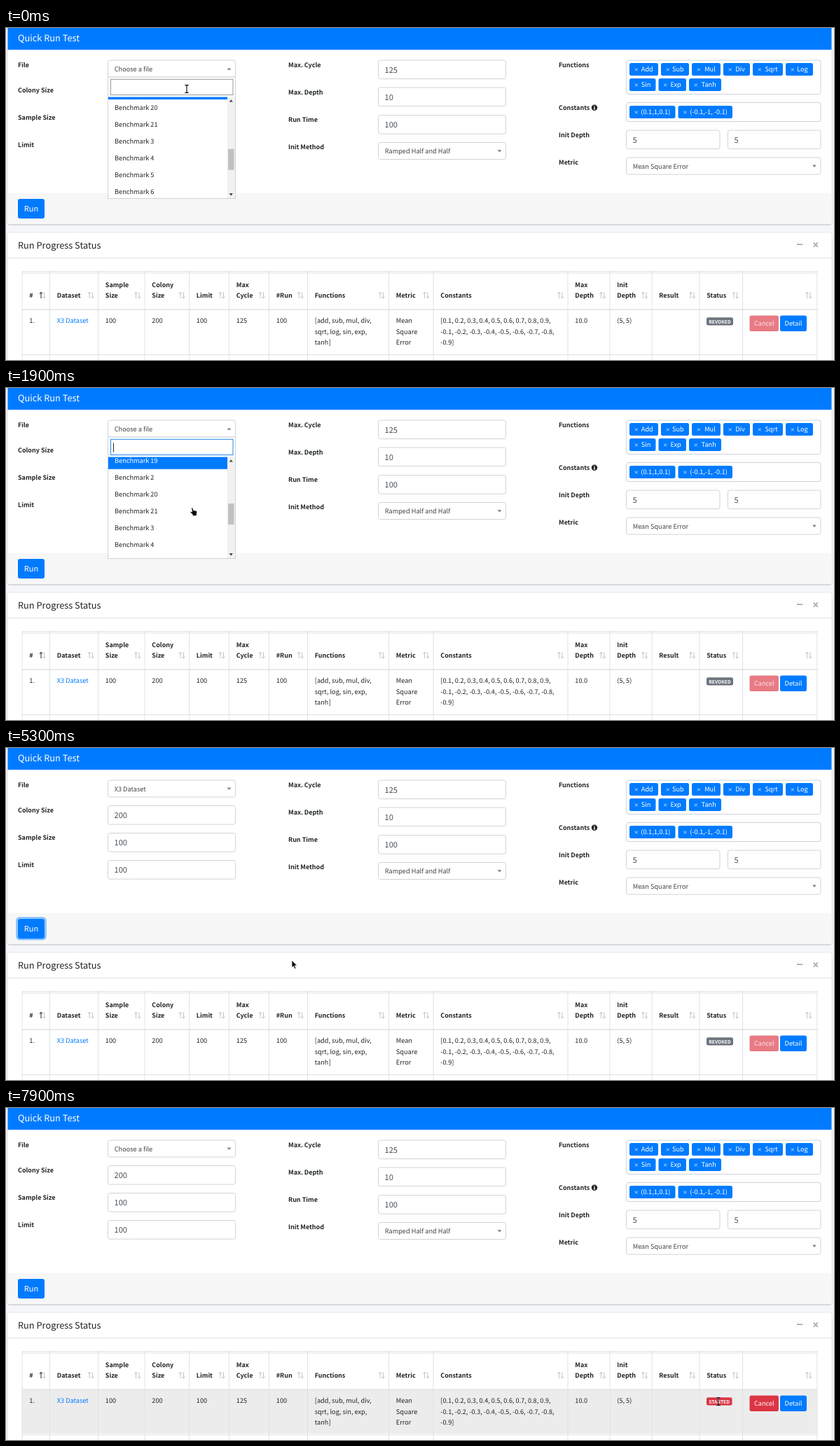
Animation, 1182 px wide and 474 px high, one loop 8 s. Source, as an HTML page:

```html
<!DOCTYPE html>
<html lang="en">
<head>
<meta charset="utf-8">
<title>Quick Run Test</title>
<style>
  html, body { margin: 0; width: 100%; height: 100%; overflow: hidden; background: #f4f6f9; }
  svg { display: block; }
  text {
    font-family: "Noto Sans CJK JP", "Noto Sans CJK SC", "Noto Sans CJK", "Open Sans", sans-serif;
    text-rendering: geometricPrecision;
    white-space: pre;
  }
</style>
</head>
<body>
<svg id="stage" width="1182" height="474" viewBox="0 0 1182 474">
  <defs>
    <clipPath id="listClip"><rect x="146" y="98.5" width="170" height="144.5"/></clipPath>
    <filter id="soft" x="-2%" y="-10%" width="104%" height="120%">
      <feDropShadow dx="0" dy=".7" stdDeviation="1" flood-opacity=".28"/>
    </filter>
  </defs>
</svg>
<script>
const stage = document.getElementById('stage');
const BLUE = '#007bff', INK = '#212529', FIELD = '#495057', EDGE = '#ced4da', LINE = '#dee2e6';
const BASE = 10.28, INPUT = 12.4, TITLE = 14.3;
const LEFT = 2.5, RIGHT = 1178.5;

function add(tag, attrs, parent = stage) {
  const node = document.createElementNS('http://www.w3.org/2000/svg', tag);
  for (const key in attrs) node.setAttribute(key, attrs[key]);
  return parent.appendChild(node);
}
const group = (parent, attrs = {}) => add('g', attrs, parent);
const rect = (x, y, x2, y2, fill, parent, extra) =>
  add('rect', { x, y, width: x2 - x, height: y2 - y, fill, ...extra }, parent);
const path = (d, attrs, parent) => add('path', { d, fill: 'none', ...attrs }, parent);

// Text placed by its left edge (or anchor) and the middle of its capitals.
function label(x, mid, str, { size = BASE, fill = INK, bold, anchor = 'start', parent } = {}) {
  const node = add('text', {
    x, y: mid + size * 0.33, fill, 'font-size': size * (bold ? 0.875 : 0.895),
    'font-weight': bold ? 700 : 400, 'text-anchor': anchor
  }, parent);
  node.textContent = str;
  return node;
}
const box = (x, y, x2, y2, parent) =>
  rect(x + .5, y + .5, x2 - .5, y2 - .5, '#fff', parent, { rx: 3, stroke: EDGE });
function input(x, y, x2, value) {
  box(x, y, x2, y + 27.6);
  label(x + 9.5, y + 14.2, value, { size: INPUT, fill: FIELD });
}
const triangle = (x, y, up, fill, parent, w = 3) =>
  path(`M${x - w},${y + (up ? 1.6 : -1.6)}h${2 * w}l${-w},${up ? -3.4 : 3.4}z`, { fill }, parent);
const cross = (x, y, r, attrs) => path(`M${x - r},${y - r}l${2 * r},${2 * r}m0,${-2 * r}l${-2 * r},${2 * r}`, attrs);
function select(x, y, x2, value) {
  box(x, y, x2, y + 25);
  triangle(x2 - 9.5, y + 12.7, false, '#888');
  return label(x + 9.7, y + 12.7, value, { fill: '#444' });
}
function tag(x, y, x2, str) {
  rect(x, y, x2, y + 18, BLUE, stage, { rx: 2.8 });
  cross(x + 9.8, y + 9.4, 1.9, { stroke: '#d9eaff', 'stroke-width': .9 });
  label(x2 - 7.2, y + 9, str, { fill: '#fff', anchor: 'end' });
}

// Run form
const cardTop = group(stage, { filter: 'url(#soft)' });
rect(LEFT, -5, RIGHT, 280, '#fff', cardTop, { rx: 3 });
rect(LEFT, 0, RIGHT, 31, BLUE);
label(17, 14.2, 'Quick Run Test', { size: TITLE, fill: '#fff' });
rect(LEFT, 235.5, RIGHT, 280, '#f7f7f7', stage, { rx: 2 });

[
  [17, ['File', 53], ['Colony Size', 89], ['Sample Size', 128], ['Limit', 167]],
  [403, ['Max. Cycle', 53], ['Max. Depth', 92], ['Run Time', 131], ['Init Method', 170]],
  [789, ['Functions', 53], ['Constants', 114], ['Init Depth', 153], ['Metric', 192]]
].forEach(([x, ...rows]) => rows.forEach(([str, y]) => label(x, y, str, { bold: true })));

const fileText = select(145, 45.5, 328, 'Choose a file');
input(145, 82, 328, '200');
input(145, 121, 328, '100');
input(145, 160, 328, '100');
input(531, 45.5, 714, '125');
input(531, 84.5, 714, '10');
input(531, 124, 714, '100');
select(531, 163, 714, 'Ramped Half and Half');
box(885, 45.5, 1163.5, 95);
box(885, 106, 1163.5, 134);
input(885, 145.5, 1019.5, '5');
input(1030, 145.5, 1163.5, '5');
select(885, 184.5, 1163.5, 'Mean Square Error');
[
  [890, 50, 931, 'Add'], [935, 50, 975, 'Sub'], [979, 50, 1020, 'Mul'],
  [1024, 50, 1062, 'Div'], [1066, 50, 1109, 'Sqrt'], [1113, 50, 1152, 'Log'],
  [890, 72, 927.5, 'Sin'], [931.5, 72, 971, 'Exp'], [975, 72, 1021, 'Tanh'],
  [890, 111, 955.5, '(0.1,1,0.1)'], [959.5, 111, 1037, '(-0.1,-1, -0.1)']
].forEach(args => tag(...args));
add('circle', { cx: 840, cy: 113.7, r: 4.2, fill: INK });
path('M840,111v1.3M839,113.3h1v2.6M838.8,116h2.4', { stroke: '#fff', 'stroke-width': 1.1 });

const ring = rect(15.5, 242.5, 56.5, 273, 'none', stage, { rx: 4, stroke: '#7fbdff', 'stroke-width': 2.4 });
const runButton = rect(17, 244, 55, 272, BLUE, stage, { rx: 3 });
label(36, 258, 'Run', { size: INPUT, fill: '#fff', anchor: 'middle' });

// Progress table
const cardBottom = group(stage, { filter: 'url(#soft)' });
rect(LEFT, 292.5, RIGHT, 490, '#fff', cardBottom, { rx: 3 });
label(17, 310, 'Run Progress Status', { size: TITLE });
path(`M${LEFT},328.5H${RIGHT}`, { stroke: '#dfdfdf' });
path('M1129,309h8', { stroke: '#adb5bd', 'stroke-width': 2 });
cross(1155.8, 309.5, 3, { stroke: '#adb5bd', 'stroke-width': 2 });

const rowShade = rect(23, 403, 1158, 465, '#ececec');
const edges = [23, 62.5, 131.5, 198, 261.5, 318.5, 375.5, 430.5, 546.5, 610, 802, 862, 922, 990, 1051.5, 1158];
path('M22.5,347.5H1158.5M22.5,349.8H1158.5M22.5,466.5H1158.5', { stroke: LINE });
path('M22.5,402H1158.5', { stroke: LINE, 'stroke-width': 1.6 });
edges.forEach(x => path(`M${x},347.5V474`, { stroke: LINE }));

const heads = ['#', 'Dataset', 'Sample|Size', 'Colony|Size', 'Limit', 'Max|Cycle', '#Run', 'Functions',
  'Metric', 'Constants', 'Max|Depth', 'Init|Depth', 'Result', 'Status', ''];
const cells = ['1.', 'X3 Dataset', '100', '200', '100', '125', '100',
  '[add, sub, mul, div,|sqrt, log, sin, exp,|tanh]', 'Mean|Square|Error',
  '[0.1, 0.2, 0.3, 0.4, 0.5, 0.6, 0.7, 0.8, 0.9,|-0.1, -0.2, -0.3, -0.4, -0.5, -0.6, -0.7, -0.8,|-0.9]',
  '10.0', '(5, 5)'];
heads.forEach((head, i) => {
  const x = edges[i] + 10.3, lines = head.split('|');
  lines.forEach((str, k) => label(x, 382 - 15.3 * (lines.length - 1 - k), str, { bold: true }));
  const right = edges[i + 1] - (i === 14 ? 2 : 0);
  path(`M${right - 12.5},386v-9m-2,2.6l2,-2.6l2,2.6`, { stroke: i ? '#c4c6c8' : INK });
  path(`M${right - 8},377v9m-2,-2.6l2,2.6l2,-2.6`, { stroke: '#c4c6c8' });
  (cells[i] || '').split('|').forEach((str, k) =>
    label(x, 418 + 15.2 * k, str, { fill: i === 1 ? BLUE : INK }));
});

const badge = rect(1000, 413.3, 1038, 424.5, '#6c757d', stage, { rx: 2.5 });
const badgeText = label(1003.2, 419, 'REVOKED', { size: 7.7, fill: '#fff', bold: true });
const cancel = rect(1061.5, 410.5, 1103, 433, '#dc3545', stage, { rx: 2.8 });
const cancelText = label(1082.3, 421.8, 'Cancel', { fill: '#fff', anchor: 'middle' });
rect(1105, 410.5, 1143, 433, BLUE, stage, { rx: 2.8 });
label(1124, 421.8, 'Detail', { fill: '#fff', anchor: 'middle' });

// File dropdown
const ROW = 23.9, LIST_TOP = 99;
const range = (from, to) => Array.from({ length: to - from + 1 }, (_, i) => from + i);
const options = ['Choose a file',
  ...[1, ...range(10, 19), 2, 20, 21, ...range(3, 9)].map(n => 'Benchmark ' + n),
  ...[3, 4, 5].map(n => `X${n} Dataset`)];

const dropdown = group(stage);
rect(312, 53, 324, 64, '#fff', dropdown);
triangle(318.5, 58.2, true, '#888', dropdown);
rect(145.5, 70, 327.5, 243.5, '#fff', dropdown, { stroke: EDGE });
const search = rect(149.5, 73.3, 324, 95.5, '#fff', dropdown);
const caret = path('M153.5,78.5V91.5', { stroke: INK }, dropdown);
const list = group(group(dropdown, { 'clip-path': 'url(#listClip)' }));
const mark = rect(146, 0, 316, ROW, BLUE, list);
const optionTexts = options.map((str, i) => label(155, (i + .5) * ROW, str, { parent: list }));
rect(316, 98.5, 327, 243, '#f1f1f1', dropdown);
triangle(321.3, 104, true, '#444', dropdown, 2.6);
triangle(321.3, 237.7, false, '#444', dropdown, 2.6);
const thumb = rect(317, 0, 325.5, 30, '#c1c1c1', dropdown);

// Pointers, each with its hotspot at 0,0
const pointers = { arrow: group(stage), hand: group(stage), beam: group(stage) };
const outlined = { fill: '#000', stroke: '#fff', 'stroke-width': .8, 'stroke-linejoin': 'round' };
path('M0,0V10.6L2.5,8.4L4.2,12.4L6,11.6L4.3,7.8H7.6Z', outlined, pointers.arrow);
path('M-.6,.4Q.4,-.7 1.4,.4L2.2,3.6L6,4.2Q7.4,4.6 7.3,6L6.8,9V11.6H.9V9.4L-2.4,6.4Q-2.4,5 -.9,5.4L.3,6Z',
  outlined, pointers.hand);
const beam = 'M-2.6,-5.6Q0,-5.6 0,-4V4Q0,5.6 -2.6,5.6M2.6,-5.6Q0,-5.6 0,-4M0,4Q0,5.6 2.6,5.6';
path(beam, { stroke: '#fff', 'stroke-width': 2, opacity: .5 }, pointers.beam);
path(beam, { stroke: '#000', 'stroke-width': 1.1 }, pointers.beam);

// Time, x, y
const route = [
  [100, 258, 87], [300, 272, 66], [500, 302, 58], [700, 302, 58], [900, 331, 60], [1000, 306, 60],
  [1100, 306, 60], [1400, 283, 172], [1700, 282, 172], [2300, 232, 169], [3000, 232, 169],
  [3200, 214, 212], [3300, 210, 212], [3800, 46, 268], [3900, 39, 262], [4200, 39, 262],
  [4900, 403, 303], [5200, 403, 303], [5300, 408, 303], [5400, 414, 304], [5600, 414, 304],
  [6100, 720, 352], [6300, 720, 352], [6700, 1001, 391], [7200, 1035, 425], [7500, 1010, 420], [7900, 1017, 419]
];
const scrolling = [[800, 0], [1400, 0], [1500, 44.75], [1700, 150], [2000, 330], [2300, 423]];
const kinds = [[0, 'beam'], [300, 'arrow'], [1300, 'hand'], [3300, 'arrow'], [3900, 'hand'],
  [4300, 'arrow'], [6600, 'hand'], [6800, 'arrow'], [7500, 'beam']];

function along(keys, t) {
  const i = keys.findIndex(key => key[0] > t);
  if (i < 0) return keys[keys.length - 1].slice(1);
  if (i === 0) return keys[0].slice(1);
  const a = keys[i - 1], b = keys[i], p = (t - a[0]) / (b[0] - a[0]);
  return a.slice(1).map((v, k) => v + (b[k + 1] - v) * p);
}
const show = (node, on) => node.setAttribute('visibility', on ? 'visible' : 'hidden');
const scrollAt = t => t < 800 ? 307.65 : along(scrolling, t)[0];

function draw(t) {
  const [x, y] = along(route, t);
  const kind = kinds.filter(key => key[0] <= t).pop()[1];
  for (const name in pointers) {
    show(pointers[name], name === kind);
    pointers[name].setAttribute('transform', `translate(${x},${y})`);
  }

  dropdown.setAttribute('display', t < 400 || (t >= 800 && t < 3300) ? 'inline' : 'none');
  const focused = t >= 800, scroll = scrollAt(t);
  // The highlight trails the wheel by one step.
  const hover = !focused ? 12 : y < LIST_TOP ? 1 : Math.floor((y - LIST_TOP + scrollAt(t - 100)) / ROW);
  search.setAttribute('stroke', focused ? '#2a86ea' : '#999');
  caret.setAttribute('display', focused ? 'inline' : 'none');
  list.setAttribute('transform', `translate(0,${LIST_TOP - scroll})`);
  mark.setAttribute('y', hover * ROW);
  optionTexts.forEach((node, i) =>
    node.setAttribute('fill', i === hover ? '#fff' : i ? INK : '#999'));
  thumb.setAttribute('y', 109 + scroll * .207);
  fileText.textContent = t >= 3300 && t < 5700 ? 'X3 Dataset' : 'Choose a file';

  runButton.setAttribute('fill', t >= 4000 && t < 4400 ? '#0069d9' : t >= 3900 && t < 4000 ? '#0073ee' : BLUE);
  show(ring, t >= 4200 && t < 5700);

  const started = t >= 6400;
  badge.setAttribute('fill', started ? '#dc3545' : '#6c757d');
  badge.setAttribute('width', started ? 36.5 : 38);
  badgeText.textContent = started ? 'STARTED' : 'REVOKED';
  cancel.setAttribute('opacity', started ? 1 : .65);
  cancelText.setAttribute('opacity', started ? 1 : .8);
  show(rowShade, t >= 6800 && y > 402);
}

function tick() {
  draw(Math.floor(performance.now() % 8000 / 100) * 100);
  requestAnimationFrame(tick);
}
tick();
</script>
</body>
</html>
```
